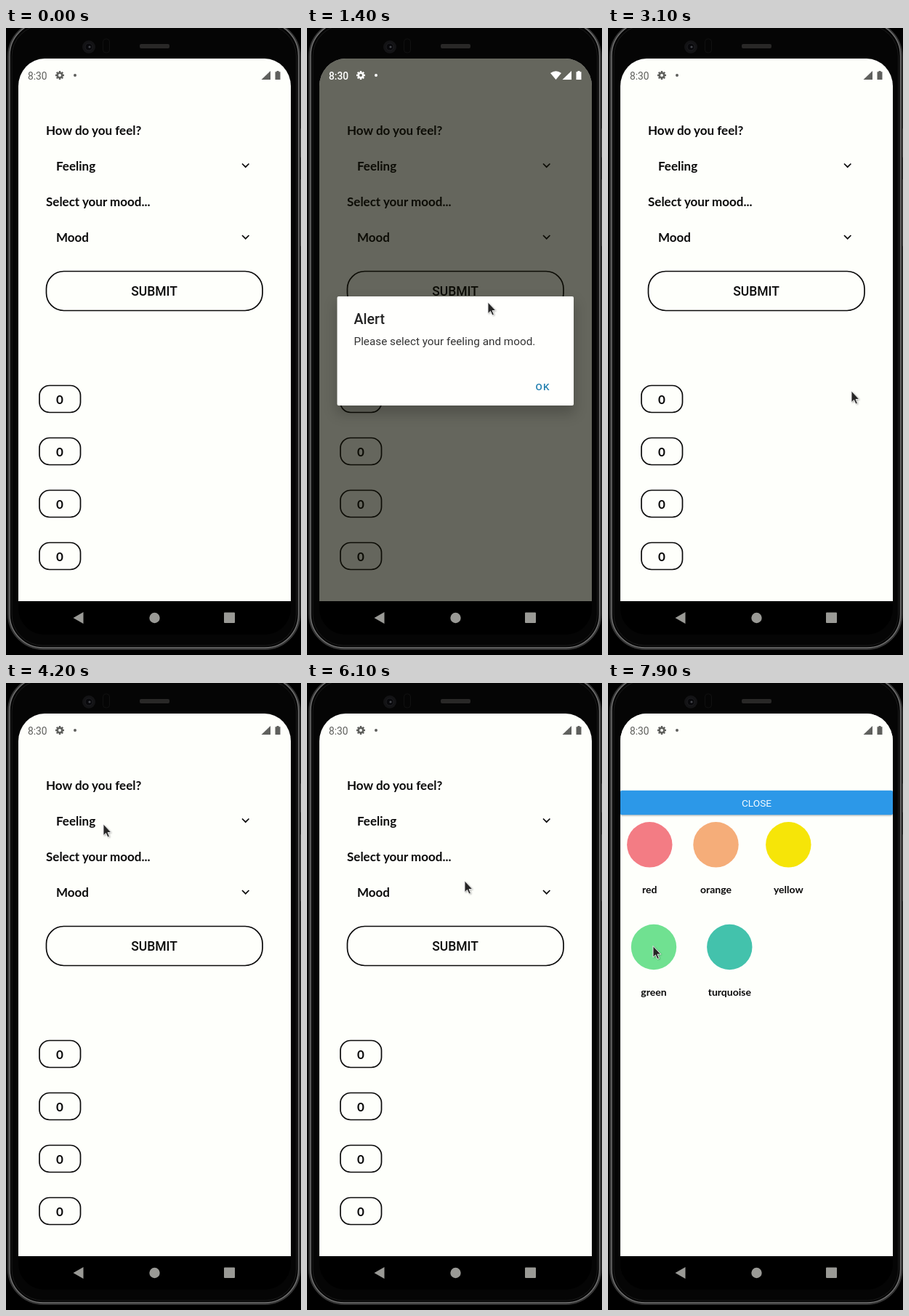
Animation of 406x862 px, one loop 8000 ms. Source, as an HTML page:

```html
<!DOCTYPE html>
<html lang="en">
<head>
<meta charset="utf-8">
<title>Mood form</title>
<style>
  html, body { margin: 0; width: 100%; height: 100%; overflow: hidden; background: #000; }
  svg { display: block; width: 100vw; height: 100vh; }
  .label { font: 700 17px Lato, sans-serif; fill: #0a0a0a; }
  .small { font: 700 14px Lato, sans-serif; fill: #0a0a0a; }
  .ui { font-family: Roboto, sans-serif; }
  .mid { text-anchor: middle; }
  .outline { fill: none; stroke: #0a0a0a; stroke-width: 1.7; }
</style>
</head>
<body>
<svg viewBox="0 0 406 862" preserveAspectRatio="none">
  <defs>
    <clipPath id="glass"><path d="M17 80A36 38 0 0 1 53 42H356A36 38 0 0 1 392 80V798A36 36 0 0 1 356 834H53A36 36 0 0 1 17 798Z"/></clipPath>
    <filter id="soft" x="-20%" y="-30%" width="140%" height="180%"><feGaussianBlur stdDeviation="9"/></filter>
    <filter id="thin" x="-5%" y="-20%" width="110%" height="150%"><feGaussianBlur stdDeviation="1"/></filter>
    <filter id="fuzz" x="-50%" y="-50%" width="200%" height="200%"><feGaussianBlur stdDeviation=".9"/></filter>
  </defs>

  <rect width="406" height="862" fill="#000"/>
  <g fill="#383838">
    <rect x="404" y="138" width="2" height="40" rx="1"/>
    <rect x="404" y="208" width="2" height="92" rx="1"/>
  </g>
  <rect x="3.500" y="-9" width="400.500" height="862.500" rx="48" fill="#050505" stroke="#343434" stroke-width="3"/>
  <rect x="5" y="-8" width="397.500" height="860" rx="46" fill="none" stroke="#727272" stroke-width="1.400"/>
  <rect x="8" y="-4" width="391.500" height="853" rx="43" fill="none" stroke="#1a1a1a"/>
  <circle cx="114" cy="26" r="9" fill="#131315"/>
  <circle cx="114" cy="26" r="5" fill="#08080b" stroke="#1e1e22"/>
  <circle cx="115" cy="26" r="1.6" fill="#44464c"/>
  <rect x="133.500" y="15" width="9" height="19" rx="4" fill="none" stroke="#111"/>
  <rect x="184" y="22" width="41" height="6" rx="2" fill="#292827"/>

  <g clip-path="url(#glass)">
    <rect x="17" y="42" width="375" height="746" fill="#fefffb"/>
    <rect x="17" y="788" width="375" height="46" fill="#000"/>
    <g id="form">
      <text class="label" x="55" y="146.500">How do you feel?</text>
      <text class="label" x="69" y="196">Feeling</text>
      <text class="label" x="55" y="245">Select your mood...</text>
      <text class="label" x="69" y="294">Mood</text>
      <path class="outline" d="M325 186.500l4.700 4.700 4.700-4.700M325 285l4.700 4.700 4.700-4.700"/>
      <g id="submit">
        <rect class="outline" x="55.500" y="334.500" width="297.500" height="54" rx="24"/>
        <text class="ui mid" x="204" y="368" font-size="17.500" font-weight="500" fill="#0a0a0a">SUBMIT</text>
      </g>
      <g id="counts"></g>
    </g>
    <g id="modal">
      <rect x="17" y="42" width="375" height="746" fill="#fefffb"/>
      <rect x="17" y="788" width="375" height="800" fill="#000"/>
      <rect x="17" y="149" width="375" height="33.500" rx="2" fill="#000" opacity=".28" filter="url(#thin)"/>
      <rect x="17" y="147.700" width="375" height="33.600" rx="2" fill="#2c98e8"/>
      <text class="ui mid" x="204.500" y="170" font-size="13.700" fill="#f4fbff">CLOSE</text>
      <g id="feelings"></g>
      <g id="moods"></g>
    </g>
    <rect id="dim" x="17" y="42" width="375" height="746" fill="#0d0e02"/>
    <g id="status">
      <text class="ui" x="30" y="70.500" font-size="13.800">8:30</text>
      <g id="gear"><circle cx="74" cy="65" r="3.300" fill="none" stroke="currentColor" stroke-width="2.600"/></g>
      <circle cx="95" cy="65" r="2"/>
      <path id="wifi" d="M335 62Q342.500 56.500 350 62L342.500 71Z"/>
      <path d="M364 59V71H351.500Z"/>
      <path d="M372.500 59h3v1.300h2V71h-7V60.300h2Z"/>
    </g>
    <g id="dialog">
      <rect x="40" y="376" width="329" height="155" rx="6" fill="#000" opacity=".2" filter="url(#soft)"/>
      <rect x="41.500" y="369" width="325.500" height="150" rx="2" fill="#fffffd"/>
      <circle id="ripple" cx="328" cy="494" fill="#f7f7fc"/>
      <g class="ui">
        <text x="64.500" y="407" font-size="19.600" font-weight="500" fill="#242424">Alert</text>
        <text x="64.500" y="436" font-size="15.300" fill="#333">Please select your feeling and mood.</text>
        <text x="314.500" y="498" font-size="13.500" font-weight="500" letter-spacing="1.200" fill="#2380b0">OK</text>
      </g>
    </g>
    <g fill="#9a9a96">
      <path d="M106.500 803V819L92.500 811Z"/>
      <circle cx="204.500" cy="811" r="7.200"/>
      <rect x="300" y="803.500" width="15" height="14.500" rx="1"/>
    </g>
  </g>

  <g id="cursor">
    <path d="M1 1V17L4.600 13.600 7.200 19 9.600 18 7.200 12.500H12Z" fill="#000" opacity=".35" filter="url(#fuzz)"/>
    <path d="M0 0V15.600L3.500 12.400 6 18 8.400 17 6 11.500H10.800Z" fill="#262626" stroke="#f4f4f4" stroke-width=".9"/>
  </g>
</svg>
<script>
const LOOP = 8000, STEP = 100, TRAVEL = 792;
const $ = id => document.getElementById(id);

function add(parent, tag, attrs, text = '') {
  const el = document.createElementNS('http://www.w3.org/2000/svg', tag);
  for (const key in attrs) el.setAttribute(key, attrs[key]);
  el.textContent = text;
  parent.append(el);
}

for (let i = 0; i < 4; i++) {
  const y = 491.5 + 72 * i;
  add($('counts'), 'rect', { class: 'outline', x: 46, y, width: 56.5, height: 37, rx: 14 });
  add($('counts'), 'text', { class: 'label mid', x: 74, y: y + 25.5 }, '0');
}
for (let i = 0; i < 8; i++) {
  add($('gear'), 'rect', { x: 72.8, y: 59, width: 2.4, height: 3, transform: `rotate(${45 * i} 74 65)` });
}
for (const [name, x, y] of [['Meh', 45.5, 227], ['Content', 130, 227], ['Happy', 238, 227], ['Frustrated', 45.5, 305.3]]) {
  add($('feelings'), 'text', { class: 'small', x, y }, name);
}
for (const [name, cx, cy, fill] of [
  ['red', 57.3, 222.3, '#f37c84'], ['orange', 148.5, 222.3, '#f5ad79'], ['yellow', 248.3, 222.3, '#f6e508'],
  ['green', 63, 363, '#70e191'], ['turquoise', 167.3, 363, '#43c2ac']
]) {
  add($('moods'), 'circle', { cx, cy, r: 31.2, fill });
  add($('moods'), 'text', { class: 'small mid', x: cx, y: cy + 66.7 }, name);
}

// Pointer path: time, x, y
const path = [
  [700, 250, 386], [800, 249, 377], [2100, 249, 377], [2200, 256, 388], [2400, 312, 455],
  [2500, 332, 487], [2600, 328, 495], [3000, 328, 495], [3100, 335, 499], [3300, 292, 420],
  [3600, 167, 233], [3900, 134, 196], [4000, 134, 196], [4200, 134, 194], [4700, 134, 194],
  [4800, 158, 236], [5000, 176, 222], [5400, 214, 168], [5600, 216, 165], [5800, 222, 190],
  [6100, 217, 272], [6400, 130, 301], [6600, 130, 301], [6700, 95, 287], [7000, 95, 287],
  [7300, 104, 318], [7700, 87, 356], [7900, 62, 361.5]
];

const clamp = v => Math.min(1, Math.max(0, v));
const show = (el, on) => el.setAttribute('display', on ? 'inline' : 'none');
const slideIn = (t, start) => TRAVEL * (1 - clamp((t - start) / 250)) ** 2;
const slideOut = (t, start) => TRAVEL * clamp((t - start) / 350) ** 2;

function pointer(t) {
  const i = path.findIndex(p => p[0] > t);
  if (i < 0) return path[path.length - 1].slice(1);
  const [t0, x0, y0] = path[i - 1], [t1, x1, y1] = path[i];
  const k = (t - t0) / (t1 - t0);
  return [x0 + (x1 - x0) * k, y0 + (y1 - y0) * k];
}

function dialogAlpha(t) {
  if (t < 1300 || t >= 3100) return 0;
  if (t < 1400) return .6;
  return t < 3000 ? 1 : .5;
}

function render(now) {
  const t = Math.floor(now % LOOP / STEP) * STEP;

  show($('cursor'), t >= 700);
  if (t >= 700) $('cursor').setAttribute('transform', `translate(${pointer(t)})`);

  $('submit').setAttribute('opacity', t < 800 || t >= 1000 ? 1 : t < 900 ? .35 : .7);

  const alpha = dialogAlpha(t);
  $('dim').setAttribute('opacity', alpha * .63);
  $('dialog').setAttribute('opacity', alpha);
  show($('dialog'), alpha > 0);
  $('ripple').setAttribute('r', t < 2800 ? 0 : t < 2900 ? 11 : 18.5);

  const lit = alpha > 0;
  const tint = lit ? '#fff' : '#5f605d';
  $('status').setAttribute('fill', tint);
  $('status').setAttribute('color', tint);
  $('status').setAttribute('font-weight', lit ? 500 : 400);
  show($('wifi'), lit);

  const first = t < 6500;
  const shift = first ? slideIn(t, 4350) + slideOut(t, 5562) : slideIn(t, 6850);
  show($('modal'), shift < TRAVEL);
  $('modal').setAttribute('transform', `translate(0 ${shift})`);
  show($('feelings'), first);
  show($('moods'), !first);
}

const begin = performance.now();
function tick() {
  render(performance.now() - begin);
  requestAnimationFrame(tick);
}
tick();
</script>
</body>
</html>
```
